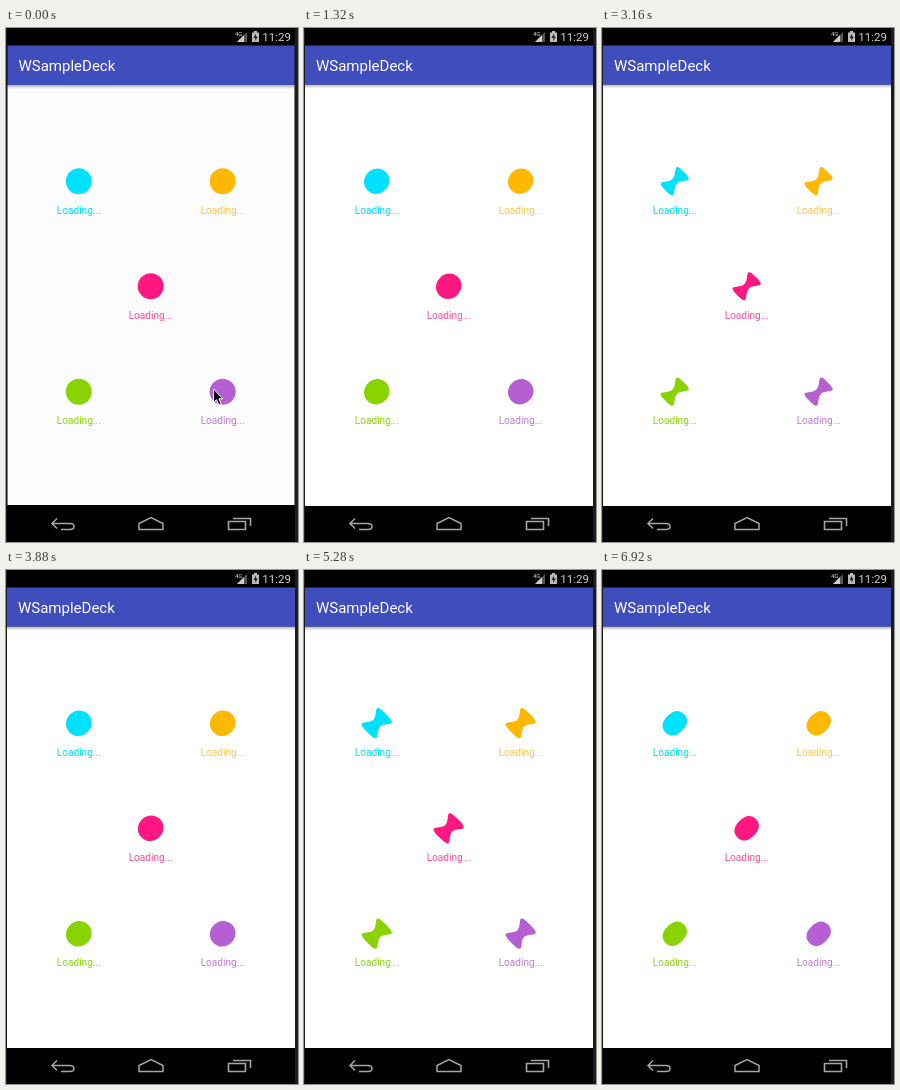
Animation of 292 by 514 pixels, one loop 6960 ms. Source, as an HTML page with a canvas:

```html
<!DOCTYPE html>
<html lang="en">
<head>
<meta charset="utf-8">
<title>Loading</title>
<style>
html, body { margin: 0; width: 292px; height: 514px; overflow: hidden; background: #000; }
canvas { display: block; }
</style>
</head>
<body>
<canvas id="stage" width="292" height="514"></canvas>
<script>
const ctx = document.getElementById('stage').getContext('2d');
const LOOP = 6960, STEP = 40, PERIOD = 427.5, HOLD = 120;
const R = 13, K = R * 0.552;

// [x, y, ball colour, label colour]
const balls = [
  [72.8, 153.2, '#00e0ff', '#00e0ff'],
  [216.7, 153.2, '#ffb800', '#ffc64a'],
  [144.7, 258.3, '#ff1782', '#ff4f98'],
  [72.8, 363.7, '#88d300', '#8fd510'],
  [216.7, 363.7, '#b65fd2', '#c27bda']
];

// [time, waist half-width, cap handle, waist handle]
const poses = [
  [0, R, K, K], [32, 12.5, K, K], [80, 10.3, 7.6, K], [150, 4.8, 20, K],
  [222, -1.8, 9, 8.5], [290, -1.4, 9, 10], [362, -0.5, 9, 11], [PERIOD, R, K, K]
];

function poseAt(time) {
  const i = poses.findIndex(p => p[0] > time);
  const a = poses[i - 1], b = poses[i];
  const f = (time - a[0]) / (b[0] - a[0]);
  return [1, 2, 3].map(n => a[n] + (b[n] - a[n]) * f);
}

function rect(x, y, w, h, color) {
  ctx.fillStyle = color;
  ctx.fillRect(x, y, w, h);
}

function text(str, x, y, size, color, align = 'left') {
  ctx.font = `${size}px Roboto, sans-serif`;
  ctx.textAlign = align;
  ctx.fillStyle = color;
  ctx.fillText(str, x, y);
}

function fillShape(d, color) {
  ctx.fillStyle = color;
  ctx.fill(new Path2D(d));
}

function strokeShape(d, color, width) {
  ctx.strokeStyle = color;
  ctx.lineWidth = width;
  ctx.stroke(new Path2D(d));
}

function drawBall(x, y, color, [waist, cap, side]) {
  ctx.save();
  ctx.translate(x, y);
  ctx.rotate(-Math.PI / 4);
  // a pale film joins the caps once the sides have met
  if (waist < 0) {
    ctx.globalAlpha = 0.4;
    rect(-8, waist - 1, 16, 2 - 2 * waist, color);
    ctx.globalAlpha = 1;
  }
  ctx.beginPath();
  ctx.moveTo(R, 0);
  ctx.bezierCurveTo(R, cap, side, waist, 0, waist);
  ctx.bezierCurveTo(-side, waist, -R, cap, -R, 0);
  ctx.bezierCurveTo(-R, -cap, -side, -waist, 0, -waist);
  ctx.bezierCurveTo(side, -waist, R, -cap, R, 0);
  ctx.fillStyle = color;
  ctx.fill();
  ctx.restore();
}

function drawStatusBar() {
  text('4G', 229, 8, 6, '#ddd');
  fillShape('M231 14 L241 4 V14 Z', '#555');
  fillShape('M231 14 L238 7 V14 Z', '#ccc');
  fillShape('M248 3 h3 v1.5 h2 V14 h-7 V4.5 h2 Z', '#bbb');
  fillShape('M250 5.5 l-2.5 4.5 h1.8 v3 l2.5 -4.5 h-1.8 Z', '#222');
  text('11:29', 285, 13, 11.5, '#d0d0d0', 'right');
}

function drawNavBar() {
  const gray = '#a5a5a5';
  strokeShape('M51 490.5 L46 495.5 L51 500.5 M46.5 495.5 H64 Q68 495.5 68 498.5 Q68 501.5 64 501.5 H55', gray, 1.5);
  strokeShape('M133 501.5 V495.5 L145 489.5 L157 495.5 V501.5 Z', gray, 1.5);
  strokeShape('M222.5 493.5 H239.5 V501.5 H222.5 Z M227 490.5 H244.5 V498', gray, 1.6);
}

function draw(now) {
  const t = Math.floor((now % LOOP) / STEP) * STEP;
  const intro = t < HOLD;
  const left = intro ? 1.5 : 1;
  const width = 289 - left - (intro ? 0.5 : 0);
  const edge = intro ? 57 : 56.5;
  const foot = intro ? 477 : 478;

  rect(0, 0, 292, 514, '#1c1c1c');
  rect(1, 0, 288, 514, '#000');
  rect(left, edge, width, foot - edge, intro ? '#fcfcfc' : '#fff');
  const shadow = ctx.createLinearGradient(0, edge, 0, edge + 4);
  shadow.addColorStop(0, 'rgba(0,0,0,.3)');
  shadow.addColorStop(1, 'rgba(0,0,0,0)');
  rect(left, edge, width, 4, shadow);
  rect(left, 17.5, width, edge - 17.5, '#404dbd');

  drawStatusBar();
  text('WSampleDeck', intro ? 12.5 : 12, intro ? 43 : 42.5, 15, '#fff');
  drawNavBar();

  const pose = poseAt(intro ? 0 : t % PERIOD);
  for (const [x, y, color, label] of balls) {
    drawBall(x, y, color, pose);
    text('Loading...', x, y + 32.6, 10.1, label, 'center');
  }

  if (intro) {
    const arrow = 'M207.5 361 V374.5 L210.5 371.7 L213 377 L215.3 376 L212.9 370.8 H217 Z';
    fillShape(arrow, '#000');
    strokeShape(arrow, '#fff', 1);
  }
}

const start = performance.now();
function tick() {
  draw(performance.now() - start);
  requestAnimationFrame(tick);
}
tick();
</script>
</body>
</html>
```
